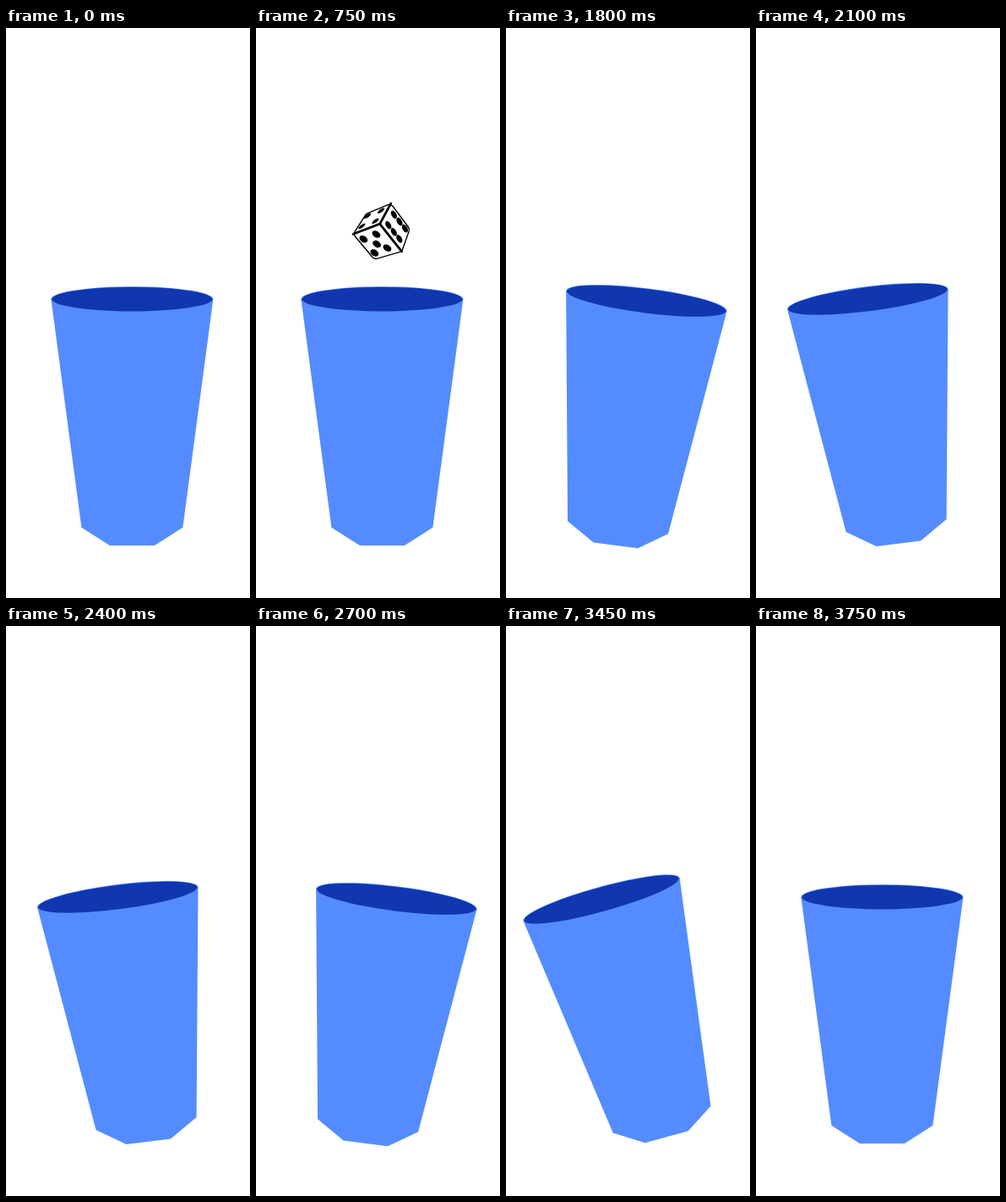
These frames come from a looping animation (289x673 px, 3900 ms). An HTML page with a canvas:

```html
<!DOCTYPE html>
<html lang="en">
<head>
<meta charset="utf-8">
<title>Dice cup</title>
<style>
  html, body { margin: 0; width: 100%; height: 100%; overflow: hidden; background: #fff; }
  canvas { display: block; }
</style>
</head>
<body>
<canvas id="stage" width="289" height="673"></canvas>
<script>
const ctx = document.getElementById('stage').getContext('2d');
const STEP = 150;
const STEPS = 26;
const SHAKE_START = 10;
const LIGHT = '#548cff';
const DARK = '#1036b0';
const RIM = { x: 149.4, y: 320.2, rx: 96, ry: 15 };
const PIVOT = { x: 141, y: 456 };

// Height of the die on each step of its fall
const FALL = [-26, 42, 124, 156, 206, 263.5, 291];

// Die corners, relative to the top left of its box
const MID = [32, 25], TOP = [45, 1], RIGHT = [67.5, 31], LOW = [58, 57.5],
      BOTTOM = [25.5, 67], LEFT = [.5, 37], UPPER = [16, 13];
const OUTLINE = [TOP, RIGHT, LOW, BOTTOM, LEFT, UPPER];

function fillEllipse(x, y, rx, ry, color) {
  ctx.beginPath();
  ctx.ellipse(x, y, rx, ry, 0, 0, Math.PI * 2);
  ctx.fillStyle = color;
  ctx.fill();
}

function drawCup(degrees) {
  ctx.save();
  ctx.translate(PIVOT.x, PIVOT.y);
  ctx.rotate(degrees * Math.PI / 180);
  ctx.translate(RIM.x - PIVOT.x, RIM.y - PIVOT.y);

  const side = [[RIM.rx, 0], [60, 269.5], [26.5, 290.8]];
  const mirrored = side.map(([x, y]) => [-x, y]).reverse();
  ctx.beginPath();
  [...side, ...mirrored].forEach(([x, y]) => ctx.lineTo(x, y));
  ctx.fillStyle = LIGHT;
  ctx.fill();
  fillEllipse(0, 0, RIM.rx, RIM.ry, LIGHT);
  fillEllipse(0, 0, RIM.rx - 1, RIM.ry - .8, DARK);
  ctx.restore();
}

// Pips sit on a grid spanned by the two face edges that meet at MID
function drawPips(endU, endV, pips) {
  ctx.save();
  ctx.transform(endU[0] - MID[0], endU[1] - MID[1],
                endV[0] - MID[0], endV[1] - MID[1], ...MID);
  pips.forEach(([u, v]) => fillEllipse(u, v, .12, .12, '#000'));
  ctx.restore();
}

function grid(us, vs) {
  return us.flatMap(u => vs.map(v => [u, v]));
}

function traceOutline() {
  const [ax, ay] = OUTLINE[0], [bx, by] = OUTLINE[5];
  ctx.beginPath();
  ctx.moveTo((ax + bx) / 2, (ay + by) / 2);
  OUTLINE.forEach((p, i) => ctx.arcTo(...p, ...OUTLINE[(i + 1) % 6], 6));
  ctx.closePath();
}

function drawDie(x, y) {
  ctx.save();
  // The front of the cup hides whatever sinks below the rim
  ctx.beginPath();
  ctx.rect(0, 0, 289, RIM.y);
  ctx.ellipse(RIM.x, RIM.y, RIM.rx, RIM.ry, 0, 0, Math.PI);
  ctx.clip();

  ctx.translate(x, y);
  traceOutline();
  ctx.fillStyle = '#fff';
  ctx.fill();
  ctx.lineWidth = 1.4;
  ctx.stroke();

  ctx.lineCap = 'round';
  ctx.lineWidth = 2.8;
  for (const corner of [TOP, LOW, LEFT]) {
    ctx.beginPath();
    ctx.moveTo(...MID);
    ctx.lineTo(...corner);
    ctx.stroke();
  }

  const ends = [.28, .79];
  drawPips(LEFT, TOP, grid(ends, ends));
  drawPips(TOP, LOW, grid(ends, [.25, .5, .75]));
  drawPips(LEFT, LOW, [...grid([.34, .82], [.25, .75]), [.55, .53]]);
  ctx.restore();
}

// Triangle wave from -2 to 2, leaning a little further at its ends
function tilt(step) {
  const level = 2 - Math.abs((step - SHAKE_START + 3) % 8 - 4);
  return level * (6.7 + .5 * Math.abs(level));
}

function draw(time) {
  const step = Math.floor(time / STEP) % STEPS;
  ctx.fillStyle = '#fff';
  ctx.fillRect(0, 0, 289, 673);
  drawCup(step < SHAKE_START ? 0 : tilt(step));
  if (step >= 1 && step <= FALL.length) {
    drawDie(113.9 + step * .15, FALL[step - 1] + .3);
  }
}

const start = performance.now();
function tick() {
  draw(performance.now() - start);
  requestAnimationFrame(tick);
}
tick();
</script>
</body>
</html>
```
